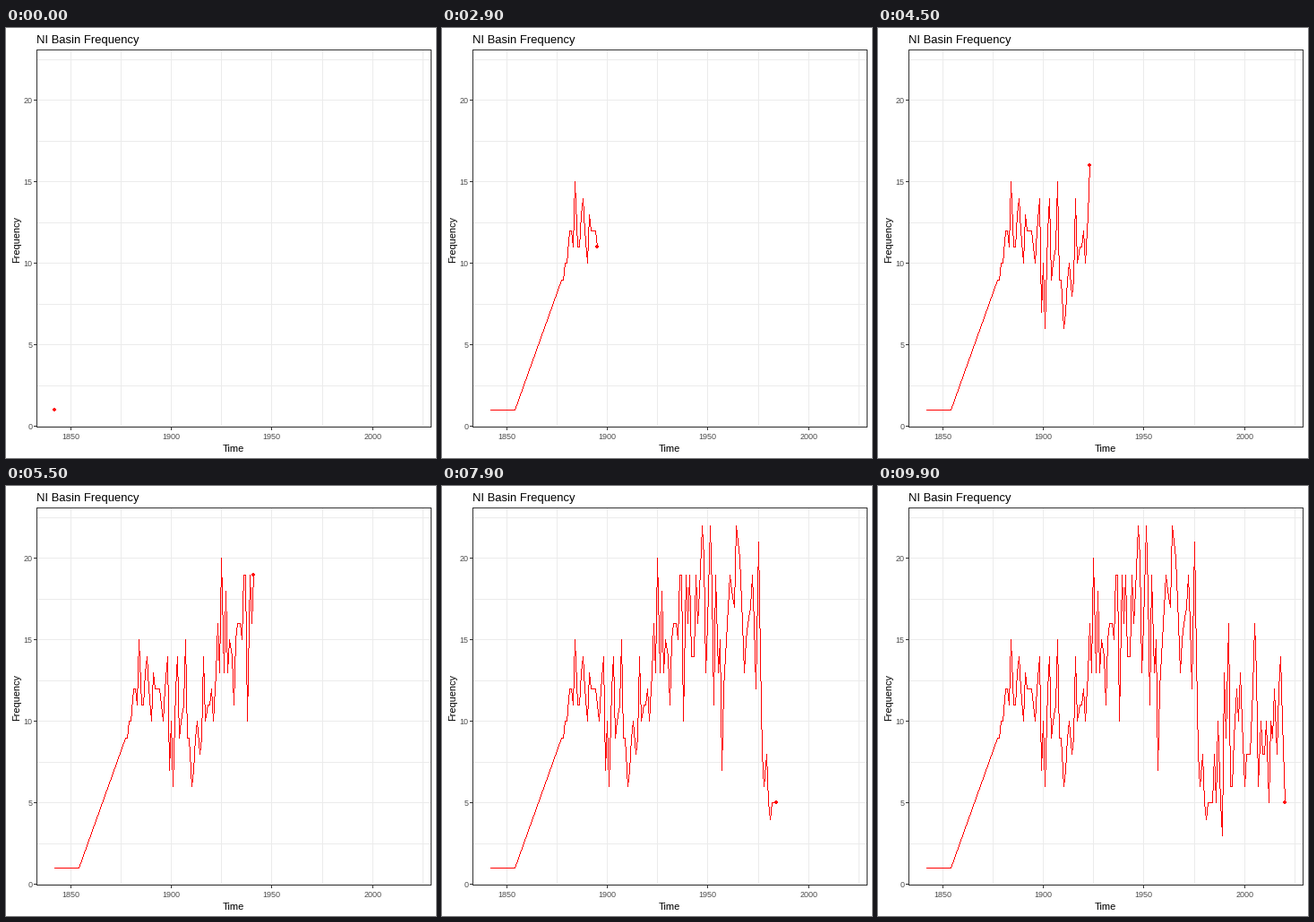
These frames come from a looping animation (480x480 px, 10 s). A matplotlib script:

```python
import numpy as np
import matplotlib.pyplot as plt
from matplotlib.animation import FuncAnimation

SIZE, DPI, FRAMES = 480, 80, 100
PX = 72 / DPI  # one pixel in points
LEFT, RIGHT, TOP, BOTTOM = 34, 474, 24, 445
RED = (255, 0, 0, 255)

plt.rcParams["font.family"] = "Liberation Sans"

# Yearly counts from 1877, after two early records
counts = [
    1, 1,
    9, 9, 10,
    10, 12, 12, 11, 15, 11, 11, 13, 14, 12,
    10, 13, 12, 12, 12, 11, 10, 12, 14, 7,
    10, 6, 12, 14, 9, 10, 11, 15, 9, 9,
    6, 7, 9, 10, 8, 9, 14, 10, 11, 11,
    12, 10, 13, 16, 13, 20, 13, 18, 13, 15,
    14, 11, 15, 16, 16, 15, 19, 19, 10, 19,
    16, 19, 14, 14, 19, 16, 18, 22, 20, 13,
    16, 22, 18, 11, 19, 13, 15, 7, 12, 15,
    17, 19, 18, 17, 22, 21, 20, 16, 13, 15,
    16, 17, 19, 16, 12, 21, 14, 8, 6, 8,
    5, 4, 5, 5, 5, 8, 5, 10, 5, 3,
    13, 9, 16, 6, 6, 9, 12, 10, 13, 10,
    6, 8, 8, 8, 12, 16, 13, 6, 10, 8,
    8, 10, 5, 10, 9, 12, 8, 12, 14, 10,
    5,
]
years = np.r_[1842, 1854, 1877:2021]
data = np.column_stack([years, counts]).astype(float)
keys = np.round((years - 1842) / 178 * (FRAMES - 1)).astype(int)


def to_px(year, count):
    """Whole-pixel position of a data point."""
    x = 54.5 + (year - 1842) * 2.2446
    y = 444.4 - 18.2 * count
    return int(np.floor(x)), int(round(y))


fig = plt.figure(figsize=(SIZE / DPI, SIZE / DPI), dpi=DPI, facecolor="white")
ax = fig.add_axes([0, 0, 1, 1])
ax.axis("off")


def rule(x0, y0, x1, y1, color):
    """Crisp line covering pixels x0..x1, y0..y1 inclusive."""
    ax.add_patch(plt.Rectangle((x0, y0), x1 - x0 + 1, y1 - y0 + 1,
                               fc=color, ec="none", lw=0, antialiased=False))


def label(x, y, text, px, color="black", **kw):
    ax.text(x, y, text, fontsize=px * PX, color=color, va="baseline", **kw)


GRID, DARK, GREY = "#ebebeb", "#333333", "#4d4d4d"

for year in range(1850, 2026, 25):
    x, _ = to_px(year, 0)
    rule(x, TOP, x, BOTTOM, GRID)
    if year % 50 == 0:
        rule(x, BOTTOM, x, BOTTOM + 3, DARK)
        label(x + 0.5, 459, str(year), 9, GREY, ha="center")

for count in np.arange(0, 23, 2.5):
    _, y = to_px(1842, count)
    rule(LEFT, y, RIGHT, y, GRID)
    if count % 5 == 0:
        rule(LEFT - 3, y, LEFT, y, DARK)
        label(29.5, y + 4, f"{count:.0f}", 9, GREY, ha="right")

for y in (TOP, BOTTOM):
    rule(LEFT, y, RIGHT, y, DARK)
for x in (LEFT, RIGHT):
    rule(x, TOP, x, BOTTOM, DARK)

label(34, 17, "NI Basin Frequency", 13)
label(254, 473, "Time", 11, ha="center")
ax.text(15, 236, "Frequency", fontsize=11 * PX, rotation=90,
        rotation_mode="anchor", ha="center", va="baseline")

layer = ax.imshow(np.zeros((SIZE, SIZE, 4), np.uint8), interpolation="nearest",
                  extent=(0, SIZE, SIZE, 0), aspect="auto", zorder=5)
ax.set_xlim(0, SIZE)
ax.set_ylim(SIZE, 0)


def stroke(img, a, b):
    """One-pixel line without smoothing."""
    n = max(abs(b[0] - a[0]), abs(b[1] - a[1])) + 1
    xs = np.round(np.linspace(a[0], b[0], n)).astype(int)
    ys = np.round(np.linspace(a[1], b[1], n)).astype(int)
    img[ys, xs] = RED


def dot(img, x, y):
    img[y - 2:y + 2, x - 1:x + 1] = RED
    img[y - 1:y + 1, x - 2:x + 2] = RED


def revealed(i):
    """Data points visible at step i, ending at the moving tip."""
    n = np.searchsorted(keys, i, side="right")
    path = data[:n]
    if keys[n - 1] < i:
        t = (i - keys[n - 1]) / (keys[n] - keys[n - 1])
        path = np.vstack([path, data[n - 1] + t * (data[n] - data[n - 1])])
    return [to_px(*p) for p in path]


def update(i):
    img = np.zeros((SIZE, SIZE, 4), np.uint8)
    path = revealed(i)
    for a, b in zip(path, path[1:]):
        stroke(img, a, b)
    dot(img, *path[-1])
    layer.set_data(img)
    return [layer]


anim = FuncAnimation(fig, update, frames=FRAMES, interval=100,
                     repeat=True, repeat_delay=0)
plt.show()
```
